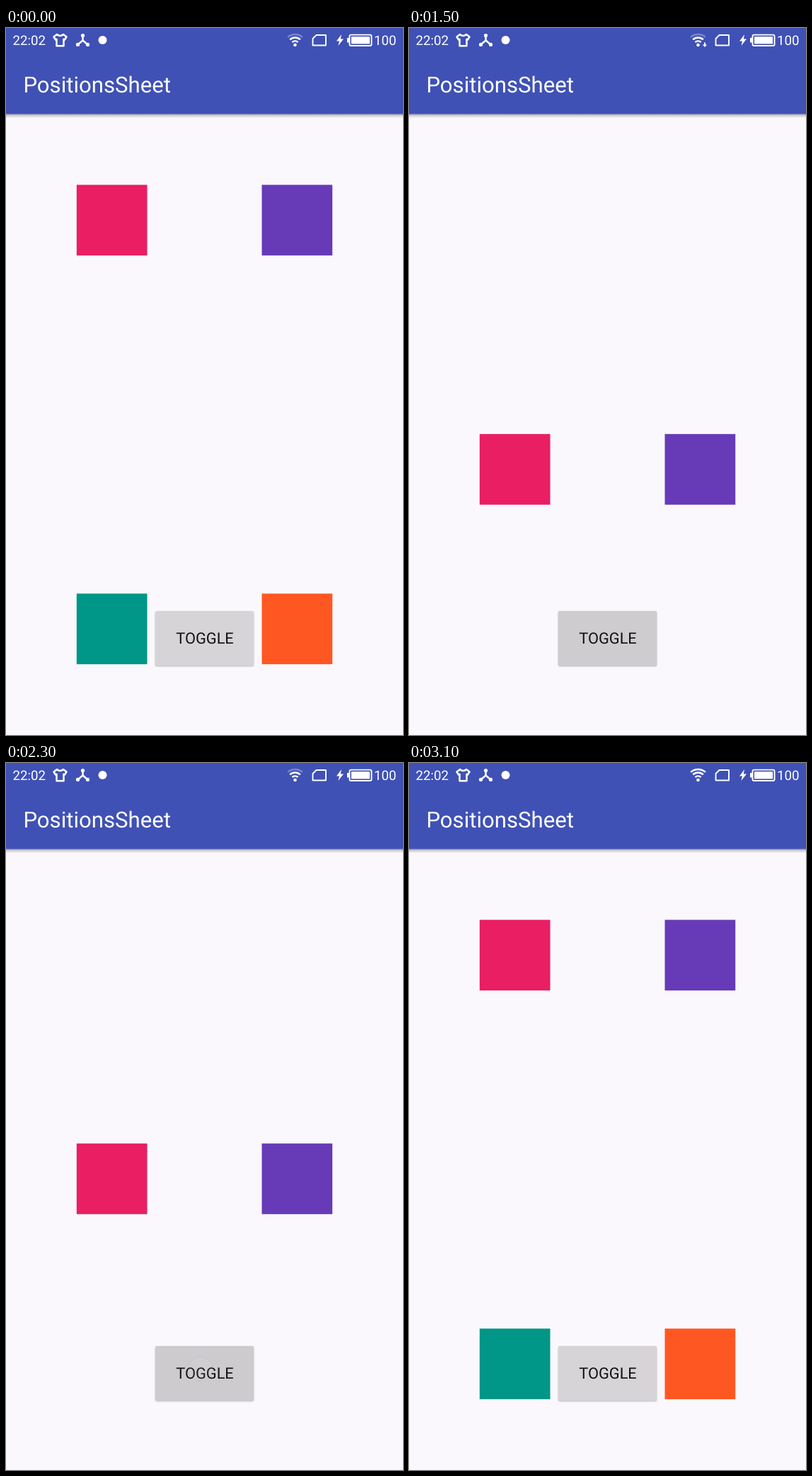
These frames come from a looping animation (561 px wide and 998 px high, 3.2 s). An HTML page:

```html
<!DOCTYPE html>
<html lang="en">
<head>
<meta charset="utf-8">
<title>Slide toggle</title>
<style>
  html, body { margin: 0; width: 100%; height: 100%; overflow: hidden; background: #faf8fc; }
  svg { display: block; width: 561px; height: 998px; }
  text { font-family: Roboto, "Liberation Sans", sans-serif; text-rendering: geometricPrecision; }
  .line { fill: none; stroke: #fff; stroke-width: 2.5; }
  .thin { stroke-width: 1.9; }
  #button { filter: drop-shadow(0 1.5px .9px rgba(0, 0, 0, .28)); }
  #button.raised { filter: drop-shadow(0 2.5px 1.6px rgba(0, 0, 0, .32)); }
</style>
</head>
<body>
<svg viewBox="0 0 561 998">
  <defs>
    <linearGradient id="shade" x2="0" y2="1">
      <stop offset="0" stop-opacity=".36"/>
      <stop offset=".4" stop-opacity=".14"/>
      <stop offset="1" stop-opacity="0"/>
    </linearGradient>
  </defs>

  <g id="top">
    <rect x="99.8" y="221.4" width="99.7" height="99.7" fill="#e91e63"/>
    <rect x="361.5" y="221.4" width="99.7" height="99.7" fill="#673ab7"/>
  </g>
  <g id="bottom">
    <rect x="99.8" y="798.4" width="99.7" height="99.7" fill="#009688"/>
    <rect x="361.5" y="798.4" width="99.7" height="99.7" fill="#ff5722"/>
  </g>

  <rect id="button" x="211" y="823" width="139" height="77" rx="2" fill="#d6d4d7"/>
  <rect id="press" x="211" y="823" width="139" height="77" rx="2" opacity="0"/>
  <text x="281" y="869.4" font-size="21.8" text-anchor="middle" fill="#111">TOGGLE</text>
  <circle id="touch" r="17" fill="#f4f4fb" fill-opacity=".62" stroke="#a9aed2" stroke-width="1.8" opacity="0"/>

  <rect y="121.6" width="561" height="6" fill="url(#shade)"/>
  <rect width="561" height="121.6" fill="#3f51b5"/>
  <text x="24.4" y="90.5" font-size="31.17" fill="#fff">PositionsSheet</text>

  <g fill="#fff">
    <text x="9.5" y="23.6" font-size="18.7">22:02</text>
    <text x="520" y="23.6" font-size="18.7">100</text>
    <path class="line" stroke-linejoin="round" d="M72 9Q76.5 13 81 9L85.5 12.5 83 16.5 81.5 15.8V25.2H71.5V15.8L70 16.5 67.5 12.5Z"/>
    <path class="line" d="M108.5 10V17.5L101.5 23.5M108.5 17.5L115.5 23.5"/>
    <circle cx="108.5" cy="10.5" r="2.6"/>
    <circle cx="101.5" cy="23.4" r="2.6"/>
    <circle cx="115.5" cy="23.4" r="2.6"/>
    <circle cx="136.5" cy="17" r="6"/>

    <path id="outer" class="line" d="M398.1 12.9A15.5 15.5 0 0 1 418.9 12.9"/>
    <path class="line" d="M401.2 16.4A10.8 10.8 0 0 1 415.8 16.4M404.5 20A6 6 0 0 1 412.5 20"/>
    <circle cx="408.5" cy="24" r="2.3"/>
    <path id="arrow" d="M417 20.5h2v3h2.2L418 27 414.8 23.5H417Z"/>

    <path class="line thin" stroke-linejoin="round" d="M438.5 10H452V24.5H433.5V15Z"/>
    <path d="M474 9L467 18.5H471L469.5 25 477 15.5H472.8Z"/>
    <rect class="line thin" x="485.5" y="9.6" width="31" height="15.4" rx="2"/>
    <rect x="482" y="14" width="3" height="6.5"/>
    <rect x="488" y="12.2" width="26" height="10.2"/>
  </g>
</svg>
<script>
  const LOOP = 3200, STEP = 100;
  const DURATION = 300, TRAVEL = 877, STAGGER = 66;
  const LEAVE = 1244, ENTER = 2180;
  const PRESS = [0, .02, .045, .04, .015];
  const TAPS = [
    { at: 1200, x: 272, y: 872, fade: [1, .35] },
    { at: 2100, x: 275, y: 855, fade: [1, .6, .1] }
  ];
  const el = id => document.getElementById(id);
  const [topRow, bottomRow, button, press, touch, outer, arrow] =
    ["top", "bottom", "button", "press", "touch", "outer", "arrow"].map(el);

  const progress = (t, start) => Math.min(1, Math.max(0, (t - start) / DURATION));

  // Rows accelerate out and decelerate in; the far row waits a little.
  function slide(t, outDelay, inDelay) {
    const part = t < TAPS[1].at
      ? progress(t, LEAVE + outDelay)
      : 1 - progress(t, ENTER + inDelay);
    return part * part * TRAVEL;
  }

  const shift = (row, y) => row.setAttribute("transform", `translate(0 ${y.toFixed(2)})`);

  function draw(now) {
    const t = Math.floor(now % LOOP / STEP) * STEP;
    shift(topRow, slide(t, STAGGER, 0));
    shift(bottomRow, slide(t, 0, STAGGER));

    const tap = t < TAPS[1].at ? TAPS[0] : TAPS[1];
    const step = (t - tap.at) / STEP;
    press.setAttribute("opacity", PRESS[step] || 0);
    button.classList.toggle("raised", step === 0 || step === 1);
    touch.setAttribute("cx", tap.x);
    touch.setAttribute("cy", tap.y);
    touch.setAttribute("opacity", tap.fade[step] || 0);

    outer.setAttribute("opacity", t >= 3100 ? 1 : .3);
    arrow.setAttribute("opacity", t >= 1200 && t < 2200 ? 1 : 0);
    requestAnimationFrame(draw);
  }
  draw(performance.now());
</script>
</body>
</html>
```
